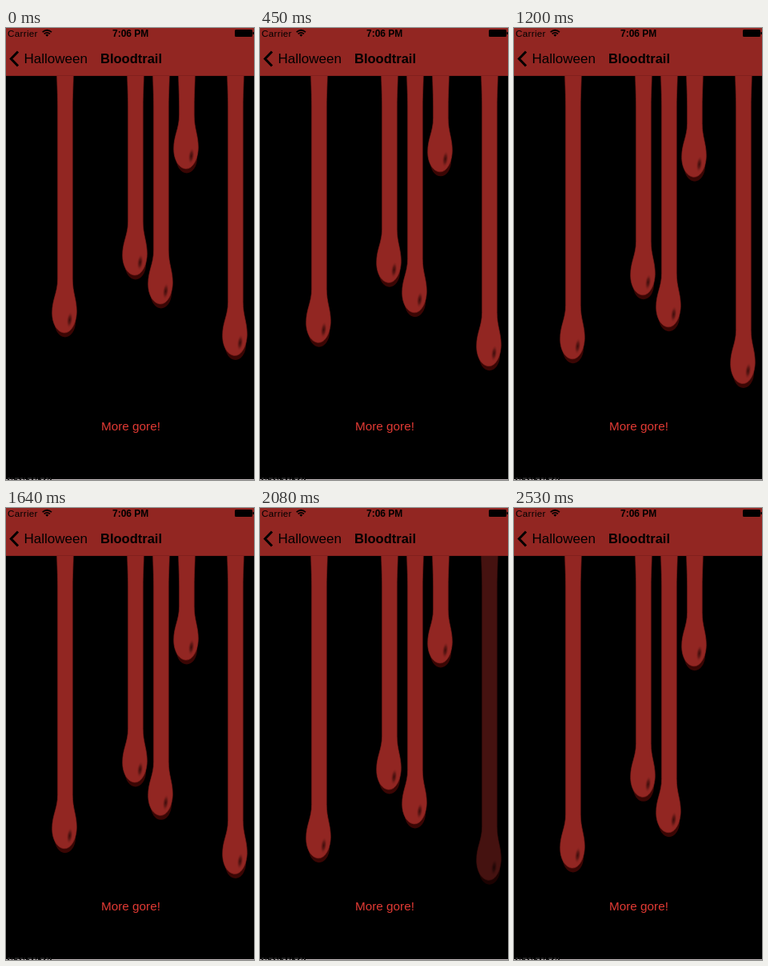
Animation, 310 px wide and 565 px high, one loop 2.66 s. Source, as an HTML page:

```html
<!DOCTYPE html>
<html lang="en">
<head>
<meta charset="utf-8">
<title>Bloodtrail</title>
<style>
  html, body { margin: 0; width: 100%; height: 100%; overflow: hidden; background: #000; }
  svg { display: block; width: 310px; height: 565px; }
  text { font-family: "Liberation Sans", Arial, sans-serif; }
  .bold { font-weight: bold; }
  .body { fill: #922622; stroke: #7c1d1a; stroke-width: .7; }
</style>
</head>
<body>
<svg viewBox="0 0 310 565">
  <defs>
    <radialGradient id="spot">
      <stop offset="0" stop-color="#3c0c0a"/>
      <stop offset=".45" stop-color="#571512" stop-opacity=".8"/>
      <stop offset="1" stop-color="#8a2320" stop-opacity="0"/>
    </radialGradient>
    <g id="tip">
      <ellipse cx="6.6" cy="-16" rx="4" ry="10.5" fill="url(#spot)" transform="rotate(7 6.6 -16)"/>
    </g>
  </defs>
  <rect width="310" height="565"/>
  <g id="drips"></g>

  <rect width="310" height="60" fill="#922622"/>
  <rect y="59.5" width="310" height=".5" fill="#6f1b18"/>
  <text x="2" y="10.5" font-size="11.7" letter-spacing=".3">Carrier</text>
  <g fill="none" stroke="#000" stroke-width="1.7">
    <path d="M45.6 5.2Q51.3 .3 57 5.2M47.6 7.4Q51.3 4.2 55 7.4"/>
    <path d="M49.3 8.7Q51.3 7 53.3 8.7L51.3 10.8Z" fill="#000" stroke="none"/>
  </g>
  <text x="133" y="10.5" font-size="12" class="bold">7:06 PM</text>
  <rect x="286" y="2" width="22" height="9" rx="1.5"/>
  <rect x="308.5" y="5" width="1.5" height="3"/>
  <path d="M15 29.5L6.3 38.5L15 47.5" fill="none" stroke="#000" stroke-width="3"/>
  <text x="22.5" y="44" font-size="17">Halloween</text>
  <text x="118" y="44" font-size="16.5" class="bold">Bloodtrail</text>
  <text x="119" y="503" font-size="15.3" fill="#e23a34">More gore!</text>

  <path d="M2 563H57" stroke="#4a4a4a" stroke-width="1.2" stroke-dasharray="3 2 1 3 5 2"/>
  <rect y="564" width="310" height="1" fill="#c4bcbe"/>
  <path d="M2 564.5H57" stroke="#222" stroke-dasharray="2 3 1 2 4 3"/>
</svg>
<script>
  const LOOP = 2660, FADE_START = 1852, FADE_TIME = 435;
  // Centre x, starting bottom y, speed in px per ms, time at which it stops
  const drips = [
    [73, 381, .0273, LOOP],
    [161, 309, .0207, LOOP],
    [193, 345, .024, LOOP],
    [225, 176, .0086, LOOP],
    [286, 409.5, .0292, 1910]
  ];
  // The picture advances in steps of these lengths, in ms
  const holds = [...Array(9).fill(150), 140, 150, 140, 150, 150, 150, 150, 150, 130];

  const layer = document.getElementById('drips');
  layer.innerHTML = drips.map(([x]) => `<g transform="translate(${x})">
    <ellipse cx=".8" rx="13.3" ry="19.5" fill="#3a0604"/>
    <path class="body"/><use href="#tip"/></g>`).join('');

  const outline = b => `M-9.5 55C-9 75 -8.4 85 -8.4 97V${b - 67}
    C-8.4 ${b - 50} -15.3 ${b - 42} -15.3 ${b - 25}
    C-15.3 ${b - 10} -8 ${b} .3 ${b}
    C8.5 ${b} 15.3 ${b - 12} 15.3 ${b - 27}
    C15.3 ${b - 42} 10.2 ${b - 50} 10.2 ${b - 67}
    V97C10.2 85 11 75 11.3 55Z`;

  function stepTime(now) {
    const t = now % LOOP;
    let start = 0;
    for (const hold of holds) {
      if (t < start + hold) break;
      start += hold;
    }
    return start;
  }

  function draw(t) {
    drips.forEach(([, y, speed, stop], i) => {
      const g = layer.children[i];
      const [shadow, body, tip] = g.children;
      const b = y + speed * Math.min(t, stop);
      shadow.setAttribute('cy', b - 14);
      body.setAttribute('d', outline(b));
      tip.setAttribute('y', b);
      const fade = stop < LOOP ? (t - FADE_START) / FADE_TIME : 0;
      g.setAttribute('opacity', 1 - Math.min(1, Math.max(0, fade)));
    });
  }

  let origin;
  function tick(now) {
    origin ??= now;
    draw(stepTime(now - origin));
    requestAnimationFrame(tick);
  }
  draw(0);
  requestAnimationFrame(tick);
</script>
</body>
</html>
```
